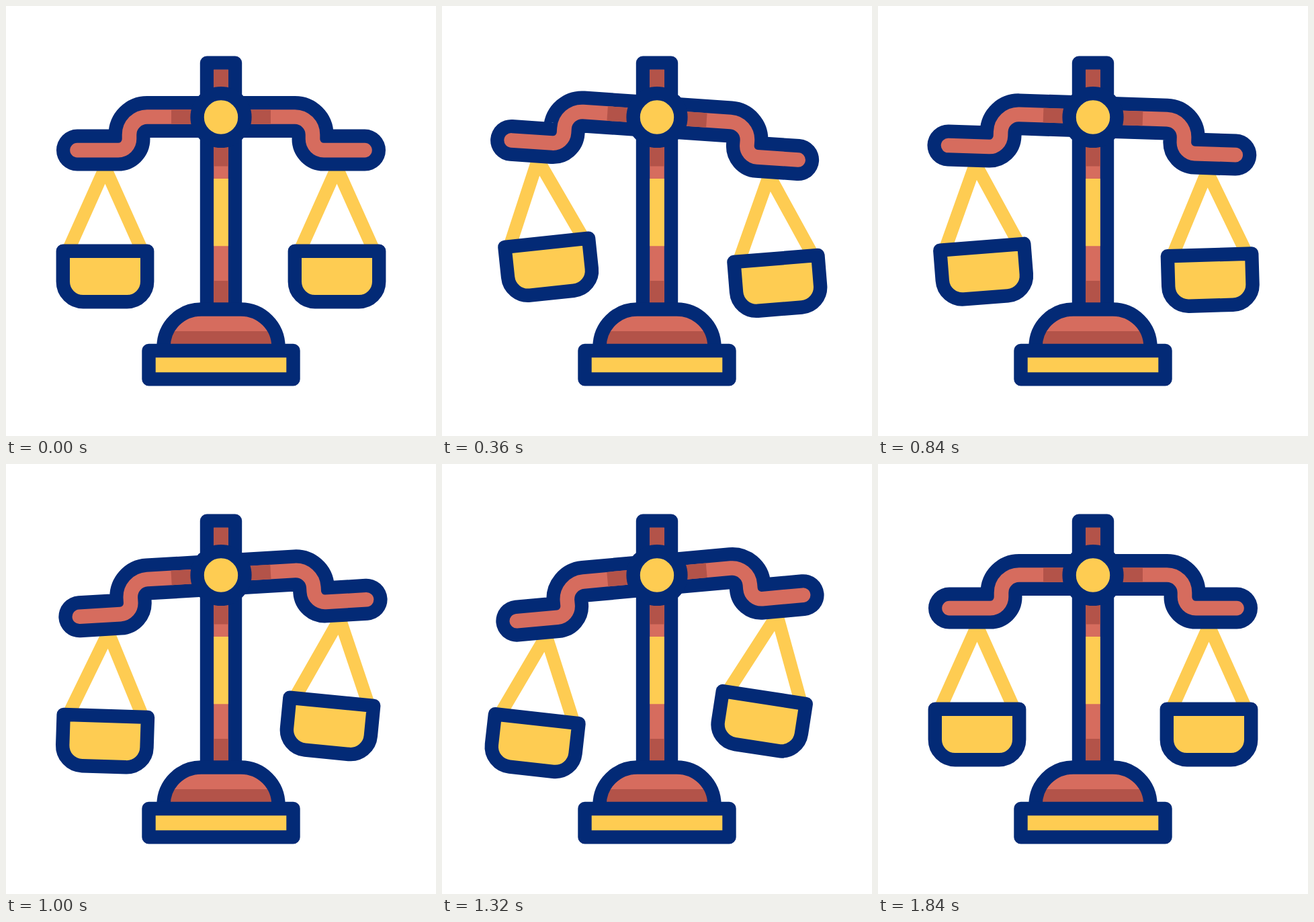
An HTML page for the animation above (2 s loop, 640x640 px).

```html
<!DOCTYPE html>
<html>
<head>
<meta charset="utf-8">
<title>Scales</title>
<style>
  html, body { margin: 0; width: 100%; height: 100%; overflow: hidden; background: #fff; }
  svg { display: block; width: 100%; height: 100%; }
  .line { stroke: #032a76; stroke-width: 20.4; stroke-linejoin: round; }
  .navy { fill: #032a76; }
  .red { fill: #d66c5e; }
  .dark { fill: #b35349; }
  .gold { fill: #fecc52; }
  .none { fill: none; }
</style>
</head>
<body>
<svg viewBox="0 0 640 640">
  <defs>
    <g id="pan">
      <path class="none" d="M92 365L147.5 241L203 365" stroke="#fecc52" stroke-width="19.3"/>
      <path class="line gold" d="M84.8 364.8H210.2V410A30 30 0 0 1 180.2 440.2H114.8A30 30 0 0 1 84.8 410Z"/>
    </g>
    <path id="arm" class="none" stroke-linecap="round" d="M106 214.6H167A16.5 16.5 0 0 0 183.5 198.1V191.5A26.5 26.5 0 0 1 210 165H320
      H430A26.5 26.5 0 0 1 456.5 191.5V198.1A16.5 16.5 0 0 0 473 214.6H534"/>
  </defs>

  <g class="beam">
    <g id="left"><use href="#pan"/></g>
    <g id="right"><use href="#pan" x="345"/></g>
  </g>

  <rect class="line red" x="299" y="84.6" width="42" height="367"/>
  <path class="dark" d="M309.2 94.8h21.6V238.5h-21.6zM309.2 409h21.6V442h-21.6z"/>
  <path class="gold" d="M309.2 257h21.6V357.3h-21.6z"/>

  <path class="red" d="M234.5 513V507.5A56 56 0 0 1 290.5 451.5H349.5A56 56 0 0 1 405.5 507.5V513Z"/>
  <path class="dark" d="M240 484H400L405 513H235Z"/>
  <path class="line none" d="M234.5 513V507.5A56 56 0 0 1 290.5 451.5H349.5A56 56 0 0 1 405.5 507.5V513"/>
  <rect class="line gold" x="212.5" y="513" width="215" height="42.4"/>

  <g class="beam">
    <use href="#arm" stroke="#032a76" stroke-width="62"/>
    <path class="navy" d="M286 135L289 131.5H351L354 135V195L351 198.5H289L286 195Z"/>
    <use href="#arm" stroke="#d66c5e" stroke-width="21.6"/>
    <path class="dark" d="M246 154.2H394V175.8H246z"/>
  </g>
  <circle class="line gold" cx="320" cy="165.5" r="35.4"/>
</svg>
<script>
  const LOOP = 2000, STEP = 40;
  const smooth = u => u * u * (3 - 2 * u);
  const speedUp = u => u ** 1.36;
  const slowDown = u => 1 - (1 - u) ** 1.36;

  // Each key: [time, angle, easing of the way to it]
  const beamKeys = [[80, 0], [600, 7, smooth], [1160, -6, smooth], [1840, 0, smooth]];
  const leftKeys = [[80, 0], [600, -10.8, smooth], [1160, 9.2, speedUp], [1840, 0, slowDown]];
  const rightKeys = [[80, 0], [600, -8.3, smooth], [1190, 10, smooth], [1780, 0, smooth]];

  function angleAt(keys, t) {
    const i = keys.findIndex(k => k[0] > t);
    if (i < 1) return 0;
    const [t0, a0] = keys[i - 1], [t1, a1, ease] = keys[i];
    return a0 + (a1 - a0) * ease((t - t0) / (t1 - t0));
  }

  const beams = document.querySelectorAll('.beam');
  const turn = (el, angle, x, y) => el.setAttribute('transform', `rotate(${angle} ${x} ${y})`);
  const left = document.getElementById('left');
  const right = document.getElementById('right');
  let start;

  function draw(now) {
    start ??= now;
    const t = Math.floor((now - start) % LOOP / STEP) * STEP;
    const tilt = angleAt(beamKeys, t);
    beams.forEach(b => turn(b, tilt, 320, 165));
    // Pan angles are measured against the ground, so the tilt is taken off
    turn(left, angleAt(leftKeys, t) - tilt, 147.5, 241);
    turn(right, angleAt(rightKeys, t) - tilt, 492.5, 241);
    requestAnimationFrame(draw);
  }
  requestAnimationFrame(draw);
</script>
</body>
</html>
```
